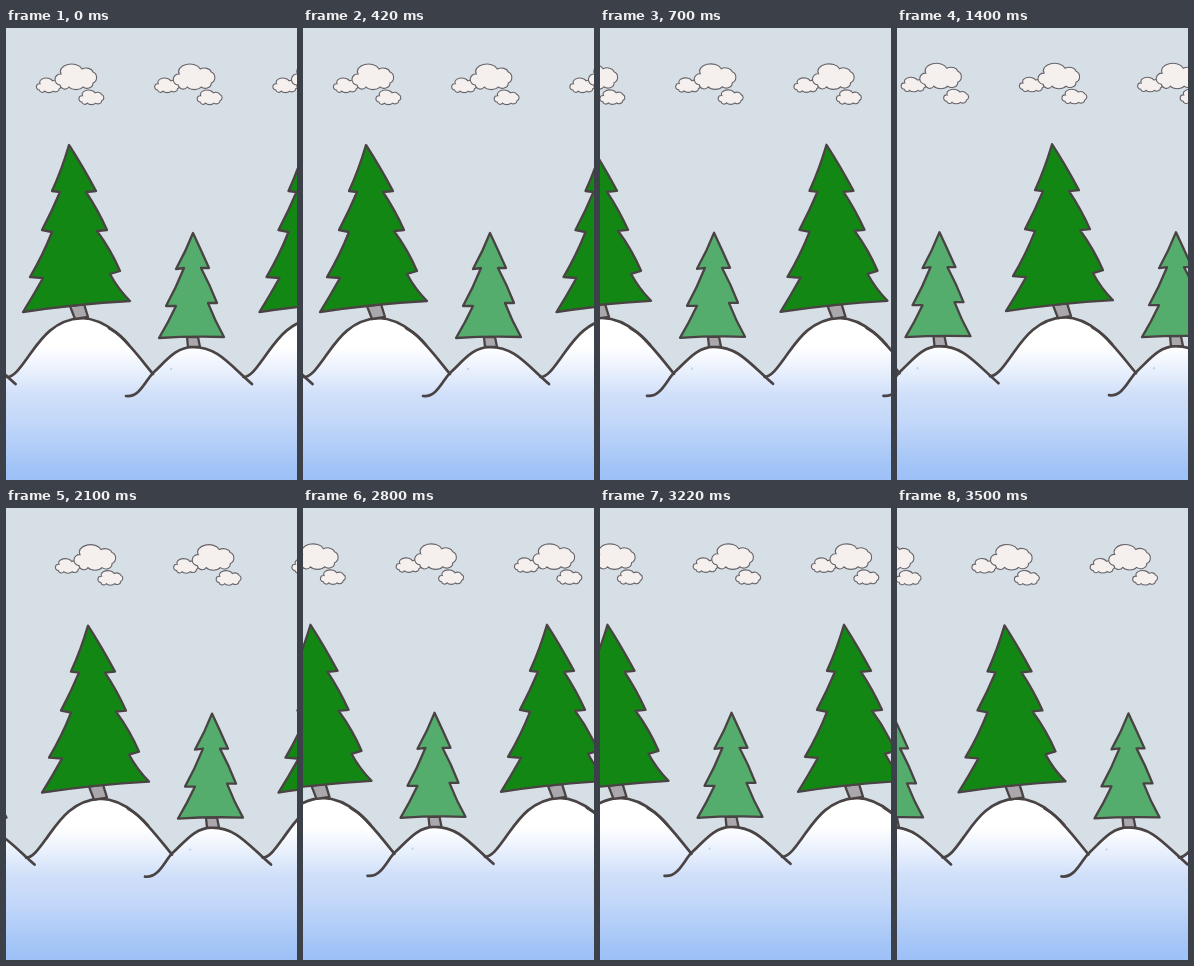
An HTML page that plays this animation: 291 px wide and 452 px high, repeating every 4200 ms.

```html
<!DOCTYPE html>
<html lang="en">
<head>
<meta charset="utf-8">
<title>Winter hills</title>
<style>
  html, body { margin: 0; height: 100%; overflow: hidden; background: #d7dfe6; }
  svg { display: block; width: 291px; height: 452px; }
  .ink { stroke: #4a4344; stroke-width: 2.3; stroke-linejoin: round; stroke-linecap: round; }
  .ridge { fill: none; stroke-width: 2.7; }
  .trunk { fill: #aba8ad; }
  .puff { fill: #f5f0ed; stroke: #66646a; stroke-width: 1.1; vector-effect: non-scaling-stroke; }
</style>
</head>
<body>
<svg viewBox="0 0 291 452">
  <defs>
    <linearGradient id="snow" gradientUnits="userSpaceOnUse" x1="0" y1="290" x2="0" y2="452">
      <stop offset=".18" stop-color="#fff"/>
      <stop offset=".32" stop-color="#eaf1fd"/>
      <stop offset=".47" stop-color="#d1e0f9"/>
      <stop offset=".65" stop-color="#c2d7f9"/>
      <stop offset=".93" stop-color="#a1c3f6"/>
      <stop offset="1" stop-color="#9dc1f7"/>
    </linearGradient>

    <path id="puff" class="puff" d="M54 57A5.500 5.500 0 0 1 55 46A10.500 7 0 0 1 76 41A7 5 0 0 1 87 44
      A6 6 0 0 1 87 55A6 5 0 0 1 77 59A8 5 0 0 1 63 59A5 5 0 0 1 54 57Z"/>
    <g id="cloud">
      <use href="#puff" transform="translate(1 29.500) scale(.6 .57)"/>
      <use href="#puff"/>
      <use href="#puff" transform="translate(43.500 41.500) scale(.6 .57)"/>
    </g>

    <g id="ground">
      <path fill="url(#snow)" d="M0 348C8 349 14 340 22 329C33 314 46 292 75 290C106 291 124 318 147 346
        C160 333 170 319 187 319C209 319 220 333 238 349V460H0Z"/>
      <circle cx="165" cy="341" r="1.200" fill="#c3d6ee"/>
    </g>

    <g id="drawing">
      <use href="#cloud"/>
      <use href="#cloud" x="118.250"/>
      <g class="ink">
        <path class="ridge" d="M1 349C8 349 14 340 22 329C33 314 46 292 75 290C106 291 124 318 147 346"/>
        <path class="ridge" d="M103 300Q115 307 123 317"/>
        <path class="ridge" d="M120 368C134 370 140 351 148 344C160 333 170 319 187 319C211 319 222 335 246 356"/>
        <path class="trunk" d="M64 278L78 276L82 289L69 291Z"/>
        <path class="trunk" d="M181 309H192L194 319H182Z"/>
        <path fill="#138714" d="M63 117Q76 137 90 163L80 164Q92 182 101 202L91 203Q105 222 114 243L104 246
          Q112 261 124 273Q70 276 17 284Q27 268 37 250L24 249Q37 227 46 204L36 202Q46 183 54 164L46 163Q56 141 63 117Z"/>
        <path fill="#55ad6d" d="M187 205Q195 222 203 240L195 240Q204 257 211 275L202 275Q209 293 218 309
          Q185 308 153 310Q162 295 170 278L160 278Q170 260 178 240L170 241Q180 223 187 205Z"/>
      </g>
    </g>
  </defs>

  <rect width="291" height="452" fill="#d7dfe6"/>
  <g id="scene">
    <use href="#ground" x="-236.500"/>
    <use href="#ground"/>
    <use href="#ground" x="236.500"/>
    <use href="#drawing" x="-236.500"/>
    <use href="#drawing"/>
    <use href="#drawing" x="236.500"/>
  </g>
</svg>
<script>
  // The landscape hops sideways, wrapping by one tile, with a slight vertical wobble.
  const HOLD = 700;
  const hops = [[0, 0], [-73, -0.2], [-144.5, -0.8], [19, 0.6], [-55.5, -0.2], [44.5, 0.4]];
  const scene = document.getElementById('scene');

  function draw() {
    const [x, y] = hops[Math.floor(performance.now() / HOLD) % hops.length];
    scene.setAttribute('transform', `translate(${x} ${y})`);
    requestAnimationFrame(draw);
  }
  draw();
</script>
</body>
</html>
```
